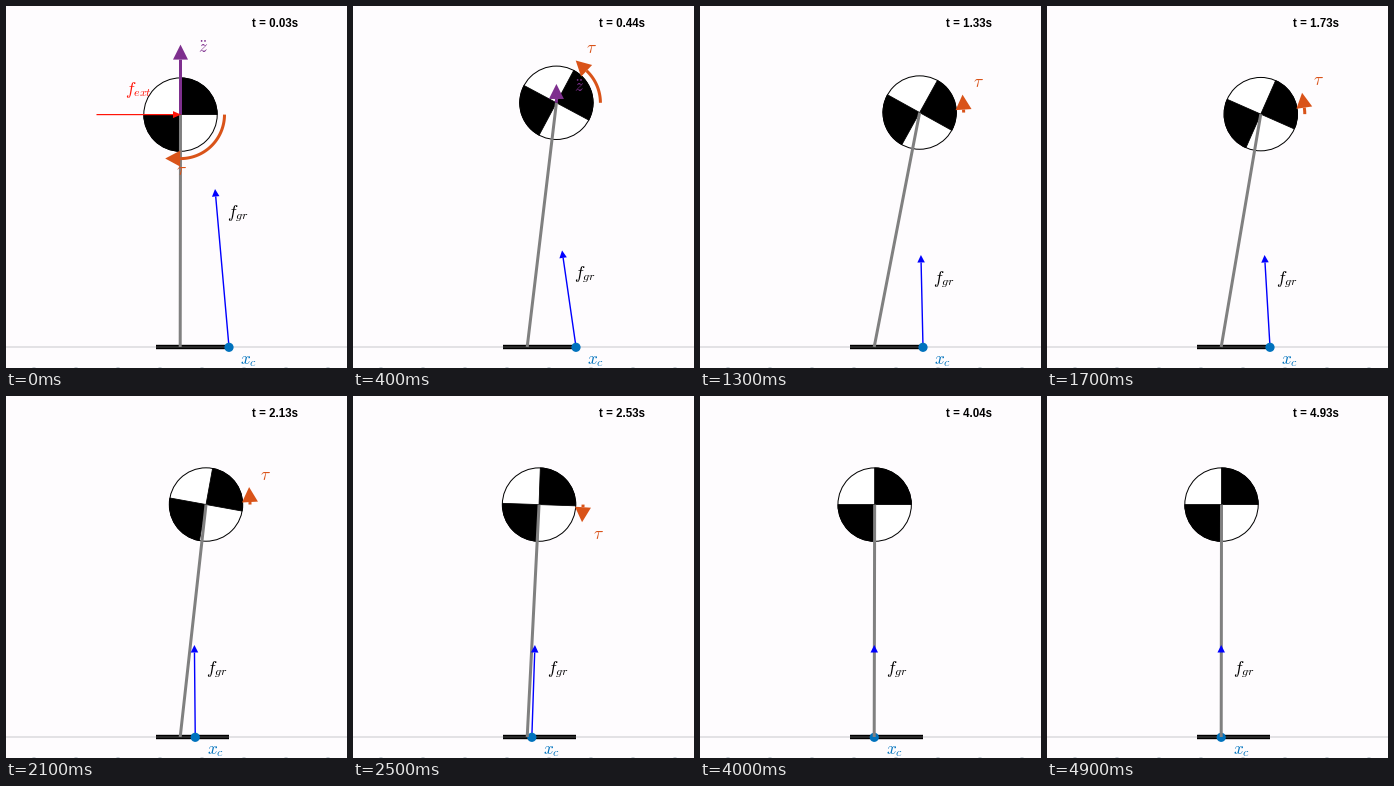
Write a matplotlib script that moves like this. It is 341 px wide and 362 px high and loops after 5 s.

```python
import numpy as np
import matplotlib.pyplot as plt
from matplotlib.animation import FuncAnimation
from matplotlib.patches import Circle, Polygon, Wedge

plt.rcParams["mathtext.fontset"] = "cm"
plt.rcParams["toolbar"] = "None"

W, H, DPI = 341, 362, 64
PT = 72 / DPI  # points per pixel
FRAMES, INTERVAL = 50, 100

BLUE, DOT, RED = "#0000ff", "#0072bd", "#ff1408"
ORANGE, PURPLE, GRAY = "#d95319", "#7e2f8e", "#808080"
GROUND_Y, ANKLE_X, HEAD_Y = 341, 174.2, 108.6
FOOT_LEFT, FOOT_RIGHT = 150, 223
WHEEL_R, ARC_R, ARROW = 36.7, 44, 15

fig = plt.figure(figsize=(W / DPI, H / DPI), dpi=DPI, facecolor="#fefcfe")
ax = fig.add_axes([0, 0, 1, 1])


def bump(t, centre, width):
    return np.exp(-((t - centre) / width) ** 2)


def falloff(t, centre, rate):
    return 1 / (1 + np.exp(rate * (t - centre)))


# Motion: the push decays quickly, then the body is steered back upright.
def head(t):
    sway = 53.5 * (1 - np.exp(-t / 5.1)) * falloff(t, 20.8, 0.305)
    lift = 5.4 * t * np.exp(-(t / 5.6) ** 1.5)
    return ANKLE_X + 0.3 + sway, HEAD_Y - lift


def tilt(t):
    return 30 * (1 - bump(t, 0, 2.4)) * falloff(t, 19.7, 0.5)


def torque(t):
    return (47 * bump(t, 4, 2.5) + 8.5 * bump(t, 17, 4.5)
            - 94 * bump(t, 0, 1.7) - 3.8 * bump(t, 25, 3))


def pressure_x(t):
    return ANKLE_X + (FOOT_RIGHT - ANKLE_X) * np.exp(-max(0, t - 17) / 3.4)


def ground_force(t):
    dx = 3.2 * bump(t, 25, 4) - 17 * bump(t, 2, 4.5) - 5.5 * bump(t, 17, 4)
    return dx, -92 - 66 * np.exp(-t / 1.5)


def rise(t):
    return 55 * np.exp(-t / 1.5)


def line(p, q, color, width, z):
    ax.plot([p[0], q[0]], [p[1], q[1]], color=color, lw=width * PT,
            solid_capstyle="butt", snap=False, zorder=z)


def arrow_head(tip, direction, length, width, color, z):
    d = np.array(direction, float) / np.hypot(*direction)
    side = np.array([-d[1], d[0]]) * width / 2
    base = np.array(tip) - d * length
    ax.add_patch(Polygon([tip, base + side, base - side], fc=color, lw=0, zorder=z))
    return base


def label(x, y, text, color, size=17.3, **style):
    ax.text(x, y, text, color=color, fontsize=size * PT, va="baseline",
            zorder=12, **style)


def draw_ground():
    line((0, GROUND_Y), (W, GROUND_Y), "#c9c9cd", 1, 1)
    for x in range(28, W, 42):
        line((x - 1.5, 361.5), (x + 1.5, 361.5), "#ccd2d8", 1, 1)
    line((FOOT_LEFT, GROUND_Y), (FOOT_RIGHT, GROUND_Y), "black", 4.4, 3)
    line((FOOT_LEFT, GROUND_Y), (FOOT_RIGHT, GROUND_Y), "#5a5a5a", 0.9, 3)


def draw_wheel(cx, cy, angle):
    ax.add_patch(Circle((cx, cy), WHEEL_R, fc="white", lw=0, zorder=4))
    for start in (-90, 90):
        ax.add_patch(Wedge((cx, cy), WHEEL_R, start + angle, start + 90 + angle,
                           fc="black", ec="black", lw=0.8 * PT, zorder=4))
    ax.add_patch(Circle((cx, cy), WHEEL_R, fill=False, ec="black", lw=PT, zorder=4))


def draw_torque(cx, cy, angle):
    if abs(angle) < 0.8:
        return
    sign = np.sign(angle)
    a = np.radians(np.linspace(0, angle, 40))
    xs, ys = cx + ARC_R * np.cos(a), cy - ARC_R * np.sin(a)
    ax.plot(xs, ys, color=ORANGE, lw=3 * PT, solid_capstyle="butt", zorder=9)
    direction = -sign * np.array([np.sin(a[-1]), np.cos(a[-1])])
    tip = np.array([xs[-1], ys[-1]]) + direction * ARROW
    arrow_head(tip, direction, ARROW, 16, ORANGE, 9)
    label(tip[0] + 10.7, tip[1] - sign * 12 + 4.5, r"$\tau$", ORANGE)


def draw_ground_force(x, force):
    tip = np.array([x, GROUND_Y]) + force
    base = arrow_head(tip, force, 7.5, 7.5, BLUE, 8)
    line((x, GROUND_Y), base, BLUE, 1.4, 2)
    ax.add_patch(Circle((x, GROUND_Y + 0.3), 4.6, fc=DOT, lw=0, zorder=5))
    label(tip[0] + 11.7, tip[1] + 28, r"$f_{gr}$", "black")
    label(x + 11.5, 358, r"$x_c$", DOT)


def draw_vertical(cx, cy, shaft):
    if shaft < 0.8:
        return
    tip = (cx, cy - shaft - ARROW)
    base = arrow_head(tip, (0, -1), ARROW, ARROW, PURPLE, 10)
    line((cx, cy), base, PURPLE, 3, 10)
    label(cx + 18, tip[1] + 8, r"$\ddot{z}$", PURPLE)


def draw_push(cx, cy):
    base = arrow_head((cx + 0.5, cy), (1, 0), 8, 7, RED, 11)
    line((cx - 84, cy), base, RED, 1.2, 11)
    label(cx - 55.5, cy - 21, r"$f_{ext}$", RED)


def update(i):
    ax.clear()
    ax.set(xlim=(0, W), ylim=(H, 0))
    ax.axis("off")
    cx, cy = head(i)
    draw_ground()
    draw_ground_force(pressure_x(i), ground_force(i))
    draw_wheel(cx, cy, tilt(i))
    line((ANKLE_X, GROUND_Y), (cx, cy), GRAY, 3, 6)
    draw_torque(cx, cy, torque(i))
    draw_vertical(cx, cy, rise(i))
    if i == 0:
        draw_push(cx, cy)
    # the clock's last digit jitters now and then
    seconds = i / 10 + (0.04 if i % 6 == 4 else 0.03)
    label(246, 21, f"t = {seconds:.2f}s", "black", 11.5,
          family="Liberation Sans", weight="bold")
    return []


anim = FuncAnimation(fig, update, frames=FRAMES, interval=INTERVAL,
                     init_func=lambda: [], repeat=True, repeat_delay=0)
plt.show()
```
